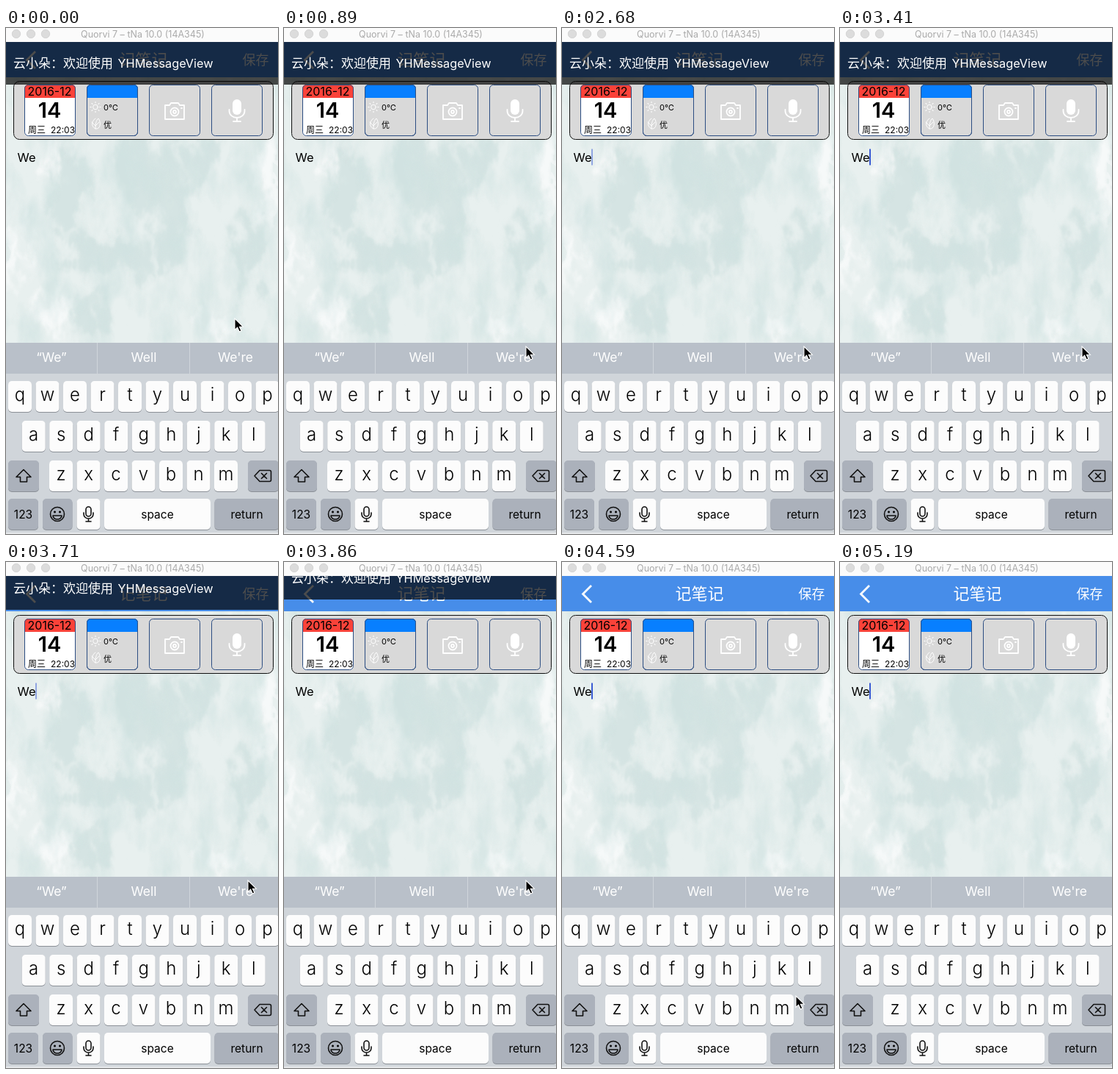
An HTML page for the animation above (5.49 s loop, 371x688 px).

```html
<!DOCTYPE html>
<html lang="zh-CN">
<head>
<meta charset="utf-8">
<title>记笔记</title>
<style>
  html, body { margin: 0; width: 100%; height: 100%; overflow: hidden; }
  svg { display: block; width: 100vw; height: 100vh; }
  text { font-family: Inter, "Noto Sans CJK SC", "Noto Sans CJK", sans-serif; }
  .mid { text-anchor: middle; }
  .white { fill: #fff; }
  .tile { fill: #d9d9d9; stroke: #2c4d82; }
  .line { fill: none; stroke: #fff; stroke-linecap: round; stroke-linejoin: round; }
  .ink { fill: none; stroke: #111; stroke-width: 1.6; stroke-linecap: round; stroke-linejoin: round; }
  .letter { font-size: 24px; font-weight: 350; }
  .word { font-size: 15.5px; }
  .hint { font-size: 17.5px; fill: #fff; }

  #banner, #caret, #pointer { animation: 5490ms step-end infinite; }
  #banner { animation-name: slide; }
  #caret { animation-name: blink; }
  #pointer { animation-name: roam; }

  @keyframes slide {
    0% { transform: translateY(0); }
    64.84% { transform: translateY(-3px); }
    67.57% { transform: translateY(-12px); }
    70.3% { transform: translateY(-26px); }
    73.04% { transform: translateY(-41px); }
    75.59% { transform: translateY(-53px); }
    78.32%, 100% { transform: translateY(-58px); }
  }
  @keyframes blink {
    0% { opacity: 0; }
    2.73% { opacity: .5; }
    5.46% { opacity: 1; }
    13.47% { opacity: .5; }
    16.2% { opacity: 0; }
    21.67% { opacity: .5; }
    24.4% { opacity: 1; }
    29.87% { opacity: .5; }
    32.42% { opacity: 0; }
    40.61% { opacity: 1; }
    48.81% { opacity: .5; }
    51.36% { opacity: 0; }
    56.83% { opacity: .5; }
    59.56% { opacity: 1; }
    67.57% { opacity: .5; }
    70.3% { opacity: 0; }
    75.59% { opacity: 1; }
    83.78% { opacity: .5; }
    86.52% { opacity: 0; }
    94.53%, 100% { opacity: 1; }
  }
  @keyframes roam {
    0% { transform: translate(312px, 395px); }
    2.73% { transform: translate(314px, 399px); }
    5.46% { transform: translate(318px, 407px); }
    8.19% { transform: translate(322px, 416px); }
    10.74% { transform: translate(326px, 425px); }
    13.47% { transform: translate(329px, 431px); }
    16.2% { transform: translate(330px, 433px); }
    73.04% { transform: translate(329px, 440px); }
    75.59% { transform: translate(324px, 464px); }
    78.32% { transform: translate(321px, 518px); }
    81.05% { transform: translate(319px, 590px); }
    83.78% { transform: translate(318px, 660px); }
    86.52%, 100% { transform: translate(318px, 720px); }
  }
</style>
</head>
<body>
<svg viewBox="0 0 371 688" preserveAspectRatio="none">
  <defs>
    <clipPath id="paperClip"><rect y="67" width="371" height="361"/></clipPath>
    <filter id="rough" x="0" y="60" width="371" height="375" filterUnits="userSpaceOnUse" color-interpolation-filters="sRGB">
      <feGaussianBlur in="SourceGraphic" stdDeviation="6" result="soft"/>
      <feTurbulence type="fractalNoise" baseFrequency=".035 .022" numOctaves="4" seed="7" result="noise"/>
      <feDisplacementMap in="soft" in2="noise" scale="70" xChannelSelector="R" yChannelSelector="G"/>
    </filter>
    <filter id="wash" x="0" y="60" width="371" height="375" filterUnits="userSpaceOnUse" color-interpolation-filters="sRGB">
      <feTurbulence type="fractalNoise" baseFrequency=".028 .013" numOctaves="4" seed="12"/>
      <feColorMatrix values="0 0 0 0 .81  0 0 0 0 .885  0 0 0 0 .88  2.6 0 0 0 -1.05"/>
    </filter>
    <clipPath id="dateClip"><rect x="25" y="77" width="70" height="70" rx="5"/></clipPath>
    <clipPath id="skyClip"><rect x="110" y="77" width="70" height="70" rx="5"/></clipPath>
  </defs>

  <!-- paper -->
  <g clip-path="url(#paperClip)">
    <rect y="67" width="371" height="361" fill="#e8f0ef"/>
    <g id="stains" filter="url(#rough)"></g>
    <rect y="60" width="371" height="375" filter="url(#wash)" opacity=".7"/>
  </g>

  <!-- navigation bar -->
  <rect y="19" width="371" height="48" fill="#478de9"/>
  <path class="line" d="M40 32 28.500 43.500 40 55" stroke-width="2.8" style="stroke-linecap:butt;stroke-linejoin:miter"/>
  <text class="mid white" x="187.500" y="51" font-size="22">记笔记</text>
  <text class="white" x="322.500" y="49.500" font-size="18">保存</text>

  <!-- tool panel -->
  <rect x="10.500" y="72.500" width="354" height="79" rx="8" fill="#d9d9d9" stroke="#111"/>
  <g clip-path="url(#dateClip)">
    <rect x="25" y="77" width="70" height="70" fill="#fff"/>
    <rect x="25" y="77" width="70" height="18" fill="#fb4239"/>
  </g>
  <rect class="tile" x="25.500" y="77.500" width="69" height="69" rx="5" style="fill:none"/>
  <text class="mid" x="59.500" y="92" font-size="16">2016-12</text>
  <text class="mid" x="59.500" y="122" font-size="29" font-weight="600">14</text>
  <text x="30" y="142.500" font-size="12">周三</text>
  <text x="61" y="142.500" font-size="12">22:03</text>

  <rect class="tile" x="110.500" y="77.500" width="69" height="69" rx="5"/>
  <rect x="110" y="77" width="70" height="18" fill="#087fff" clip-path="url(#skyClip)"/>
  <rect class="tile" x="110.500" y="77.500" width="69" height="69" rx="5" style="fill:none"/>
  <g class="line">
    <circle cx="122" cy="107.500" r="3.3"/>
    <g id="rays"></g>
    <path d="M122 123c-6 4-6 11 0 14 7 1 8-9 4-14-3 2-4 7-4 14m-5-9 5 5m5-5-5 5"/>
  </g>
  <text x="133" y="111.500" font-size="11">0℃</text>
  <text x="133" y="135.500" font-size="11">优</text>

  <rect class="tile" x="195.500" y="77.500" width="69" height="69" rx="5"/>
  <g class="line" stroke-width="1.8">
    <path d="M218 105h5l2-3h10l2 3h6v19h-26v-19z"/>
    <circle cx="230" cy="114" r="5.500"/>
    <circle cx="230" cy="114" r="2"/>
    <path d="M239 109h1"/>
  </g>

  <rect class="tile" x="280.500" y="77.500" width="69" height="69" rx="5"/>
  <rect class="white" x="309" y="97" width="12" height="21" rx="6"/>
  <path class="line" stroke-width="1.8" d="M304.500 111v2a10.500 9 0 0 0 21 0v-2M315 122v5M310 127h10"/>

  <!-- note -->
  <text x="15.500" y="182" font-size="16.500">We</text>
  <rect id="caret" x="40" y="164.500" width="2" height="22" fill="#3a5bd4"/>

  <!-- keyboard -->
  <rect y="428" width="371" height="42" fill="#b9c0c9"/>
  <path d="M124.500 428v42M250.500 428v42" stroke="#d0d5db"/>
  <text class="hint mid" x="62" y="454">“We”</text>
  <text class="hint mid" x="188" y="454">Well</text>
  <text class="hint mid" x="313" y="454">We're</text>
  <rect y="470" width="371" height="218" fill="#d0d5da"/>
  <rect y="686" width="371" height="2" fill="#e6e8ea"/>
  <g id="keys"></g>
  <path class="ink" d="M24 600.500 14 610.500h5.500v6.500h9v-6.500h5.500z"/>
  <path class="ink" d="M346 601.500h13.500a2 2 0 0 1 2 2v11a2 2 0 0 1-2 2h-13.500l-7-7.500zM348.500 605.500l7 7m0-7-7 7"/>
  <circle class="ink" cx="70" cy="661" r="9.500"/>
  <circle cx="66.500" cy="658" r="1.500"/>
  <circle cx="73.500" cy="658" r="1.500"/>
  <path class="ink" d="M64 663h12a6 5 0 0 1-12 0z"/>
  <rect class="ink" x="109" y="651" width="7" height="13" rx="3.500"/>
  <path class="ink" d="M106 659v2a6.500 6 0 0 0 13 0v-2M112.500 667v4M109 671h7"/>

  <!-- message banner -->
  <g id="banner">
    <rect y="19" width="371" height="58" fill="#000" fill-opacity=".7"/>
    <text class="white" x="10" y="54" font-size="17">云小朵：欢迎使用</text>
    <text class="white" x="152.500" y="54" font-size="16.300">YHMessageView</text>
  </g>

  <!-- window title -->
  <rect width="371" height="19" fill="#fbfbfb"/>
  <g fill="#dcdcdc" stroke="#cfcfcf" stroke-width=".8">
    <circle cx="14" cy="8" r="5.700"/><circle cx="34" cy="8" r="5.700"/><circle cx="54" cy="8" r="5.700"/>
  </g>
  <text class="mid" x="186.500" y="13" font-size="12.500" fill="#aaa">Quorvi 7 – tNa 10.0 (14A345)</text>

  <path id="pointer" d="M0 0v15.500l3.600-3.300 2.700 5.800 2.700-1.200-2.600-5.600h4.900z" fill="#000" stroke="#fff" stroke-width="1.100"/>
</svg>
<script>
  const byId = id => document.getElementById(id);

  function add(parent, tag, attrs, label) {
    const node = document.createElementNS("http://www.w3.org/2000/svg", tag);
    for (const name in attrs) node.setAttribute(name, attrs[name]);
    if (label) node.textContent = label;
    parent.append(node);
  }

  function key(x, y, width, label, grey, type = "word") {
    const keys = byId("keys");
    const box = { x, width, height: 42, rx: 5 };
    add(keys, "rect", { ...box, y: y + 1, fill: "#8b9097" });
    add(keys, "rect", { ...box, y, fill: grey ? "#abb1bb" : "#fcfcfc" });
    if (label) {
      add(keys, "text", { class: "mid " + type, x: x + width / 2, y: y + 27 }, label);
    }
  }

  const rows = [["qwertyuiop", 3, 480], ["asdfghjkl", 21.7, 534], ["zxcvbnm", 59, 588]];
  for (const [letters, left, y] of rows) {
    [...letters].forEach((c, i) => key(left + i * 37.5, y, 32, c, false, "letter"));
  }
  key(3, 588, 42, "", true);
  key(330, 588, 42, "", true);
  key(3, 640, 41, "123", true);
  key(50, 640, 40.5, "", true);
  key(96.5, 640, 32, "");
  key(134, 640, 145, "space");
  key(284.5, 640, 88, "return", true);

  for (let a = 0; a < 360; a += 45) {
    add(byId("rays"), "path", { d: "M122 101.800v-1.500", transform: `rotate(${a} 122 107.5)` });
  }

  // Watercolour stains: centre and radii
  const teal = [[85, 225, 24, 62], [225, 245, 26, 85], [140, 310, 62, 28], [180, 200, 30, 55],
    [330, 310, 18, 60], [120, 395, 24, 34], [265, 180, 18, 38]];
  const pale = [[8, 305, 18, 45], [350, 185, 28, 26], [320, 110, 34, 20], [55, 178, 13, 12],
    [65, 385, 26, 24], [300, 405, 36, 18], [366, 245, 12, 45]];
  const stain = (fill, opacity) => ([cx, cy, rx, ry]) =>
    add(byId("stains"), "ellipse", { cx, cy, rx, ry, fill, opacity });
  teal.forEach(stain("#cfe1df", .75));
  pale.forEach(stain("#f8fafa", .9));
</script>
</body>
</html>
```
